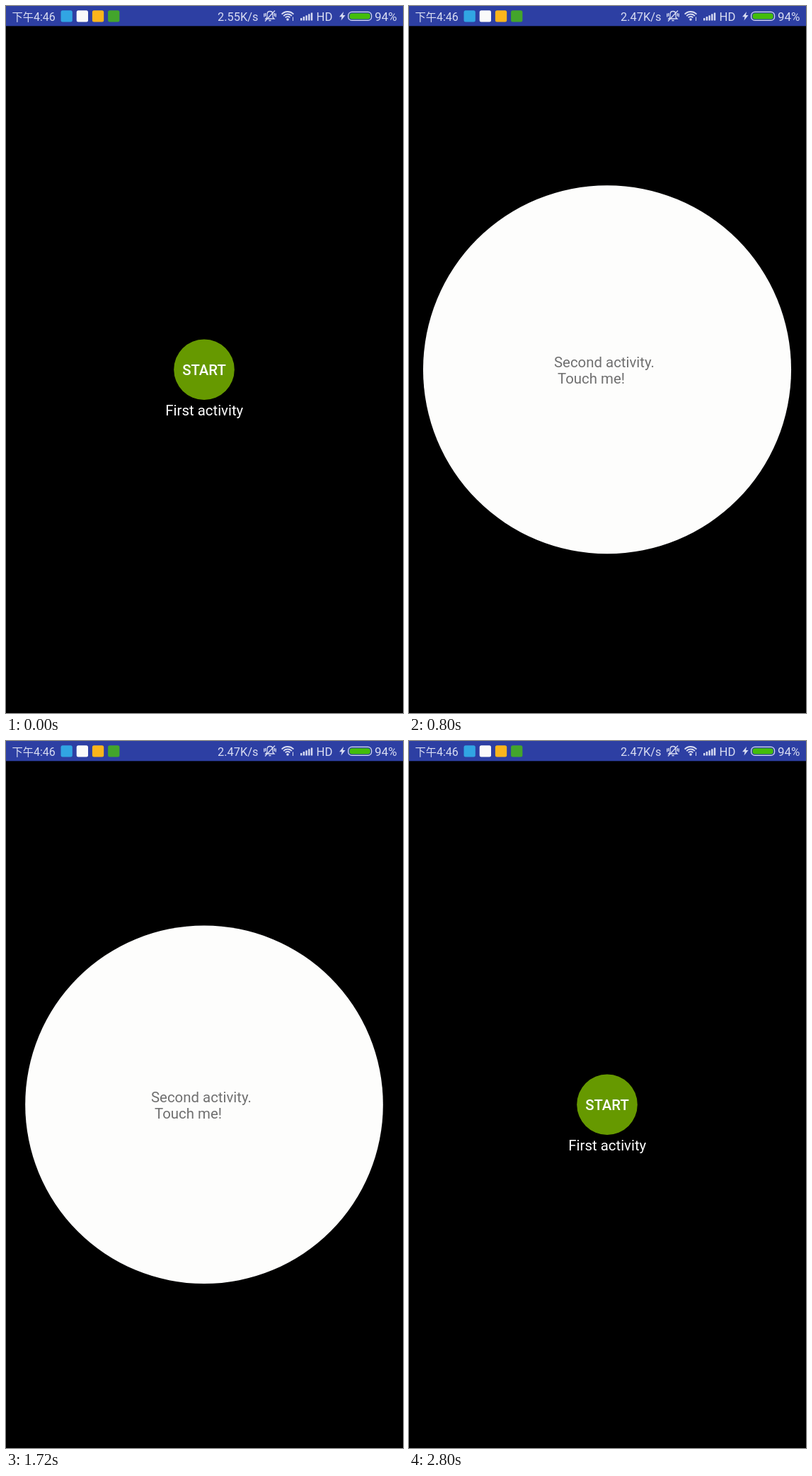
An HTML page with a canvas that plays this animation: 561x998 px, repeating every 2880 ms.

```html
<!DOCTYPE html>
<html lang="en">
<head>
<meta charset="utf-8">
<title>Circular reveal</title>
<style>
  html, body { margin: 0; width: 100%; height: 100%; overflow: hidden; background: #000; }
  canvas { display: block; }
</style>
</head>
<body>
<canvas id="stage" width="561" height="998"></canvas>
<script>
const ctx = document.getElementById('stage').getContext('2d');
const W = 561, H = 998, LOOP = 2880, STEP = 40;
const CX = 280, CY = 513.2, BUTTON_R = 42.8;
const BODY = '20.4px Roboto, sans-serif';
const PALE = '#d9ddf2';

function text(str, x, y, font, color, align = 'left') {
  ctx.font = font;
  ctx.fillStyle = color;
  ctx.textAlign = align;
  ctx.fillText(str, x, y);
}

function disc(x, y, r, color) {
  ctx.fillStyle = color;
  ctx.beginPath();
  ctx.arc(x, y, r, 0, Math.PI * 2);
  ctx.fill();
}

function box(x, y, w, h, r, color) {
  ctx.fillStyle = color;
  ctx.beginPath();
  ctx.roundRect(x, y, w, h, r);
  ctx.fill();
}

const ease = p => (1 - Math.cos(Math.PI * Math.min(1, Math.max(0, p)))) / 2;

// Radius of the second screen; zero while it is closed.
function revealRadius(t) {
  if (t < 640 || t >= 1880) return 0;
  if (t < 1400) return 40 + 991.5 * ease((t - 622) / 570);
  const p = 0.596 + (t - 1680) / (t < 1680 ? 360 : 430);
  return 42.5 + 955 * (1 - ease(p));
}

function drawFirst() {
  ctx.fillStyle = '#000';
  ctx.fillRect(0, 0, W, H);
  disc(CX, CY, BUTTON_R, '#669900');
  text('START', CX, 521.3, '500 20.4px Roboto, sans-serif', '#fff', 'center');
  text('First activity', CX + 0.3, 578, BODY, '#fff', 'center');
}

function drawSecond(r) {
  ctx.save();
  ctx.beginPath();
  ctx.arc(CX, CY, r, 0, Math.PI * 2);
  ctx.clip();
  ctx.fillStyle = '#fdfdfc';
  ctx.fillRect(0, 0, W, H);
  text('Second activity.', 205, 509.5, BODY, '#707070');
  text(' Touch me!', 205, 533.4, BODY, '#707070');
  ctx.restore();
}

function drawBell() {
  ctx.strokeStyle = PALE;
  ctx.lineWidth = 1.3;
  ctx.beginPath();
  ctx.moveTo(367, 18);
  ctx.lineTo(369, 16);
  ctx.lineTo(369, 12);
  ctx.bezierCurveTo(369, 6, 377, 6, 377, 12);
  ctx.lineTo(377, 16);
  ctx.lineTo(379, 18);
  ctx.closePath();
  ctx.moveTo(371.5, 20.5);
  ctx.lineTo(374.5, 20.5);
  ctx.moveTo(380, 6.5);
  ctx.lineTo(366, 21.5);
  for (const side of [-1, 1]) {
    ctx.moveTo(373 + side * 6.3, 10);
    ctx.lineTo(373 + side * 6.3, 14.5);
    ctx.moveTo(373 + side * 8.2, 10.5);
    ctx.lineTo(373 + side * 8.2, 15.5);
  }
  ctx.stroke();
}

function drawWifi() {
  ctx.strokeStyle = PALE;
  ctx.lineWidth = 1.8;
  for (const r of [4.5, 8, 11.5]) {
    ctx.beginPath();
    ctx.arc(398, 19.5, r, -Math.PI * 0.76, -Math.PI * 0.24);
    ctx.stroke();
  }
  disc(398, 19, 1.8, PALE);
  ctx.lineWidth = 1;
  ctx.beginPath();
  ctx.moveTo(405.5, 15.5);
  ctx.lineTo(405.5, 21);
  ctx.stroke();
}

function drawBattery() {
  ctx.fillStyle = PALE;
  ctx.beginPath();
  ctx.moveTo(477, 8);
  ctx.lineTo(471, 15.3);
  ctx.lineTo(474.5, 15.3);
  ctx.lineTo(473.5, 20.5);
  ctx.lineTo(479.5, 13);
  ctx.lineTo(476, 13);
  ctx.closePath();
  ctx.fill();
  ctx.strokeStyle = PALE;
  ctx.lineWidth = 1.2;
  ctx.beginPath();
  ctx.roundRect(483.6, 8.4, 33, 12, 5);
  ctx.stroke();
  box(485.5, 10.2, 29.2, 8.4, 3.5, '#43bd0b');
}

function drawStatus(speed) {
  ctx.fillStyle = '#2d3fa3';
  ctx.fillRect(0, 0, W, 28.3);
  text('下午', 8.5, 20.5, '15.3px "Noto Sans CJK SC", "Noto Sans CJK", sans-serif', PALE);
  text('4:46', 39, 20.8, '16px Roboto, sans-serif', PALE);
  ['#31a5e3', '#fafafa', '#fbb51c', '#43a52c'].forEach((color, i) =>
    box(77.5 + i * 22.2, 6.3, 16.3, 16.3, 2.5, color));
  text(speed, 299, 20.8, '16.4px Roboto, sans-serif', PALE);
  drawBell();
  drawWifi();
  for (let i = 0; i < 5; i++) {
    const h = 3.5 + i * 1.9;
    box(416 + i * 3.7, 20.5 - h, 2.4, h, 0.5, PALE);
  }
  text('HD', 438.5, 20.8, '16.7px Roboto, sans-serif', PALE);
  drawBattery();
  text('94%', 521, 20.8, '17px Roboto, sans-serif', PALE);
}

function draw(t) {
  drawFirst();
  const r = revealRadius(t);
  if (r > 0) drawSecond(r);
  drawStatus(t < 720 ? '2.55K/s' : '2.47K/s');
}

const start = performance.now();
function tick() {
  const t = (performance.now() - start) % LOOP;
  draw(Math.floor(t / STEP) * STEP);
  requestAnimationFrame(tick);
}
tick();
</script>
</body>
</html>
```
